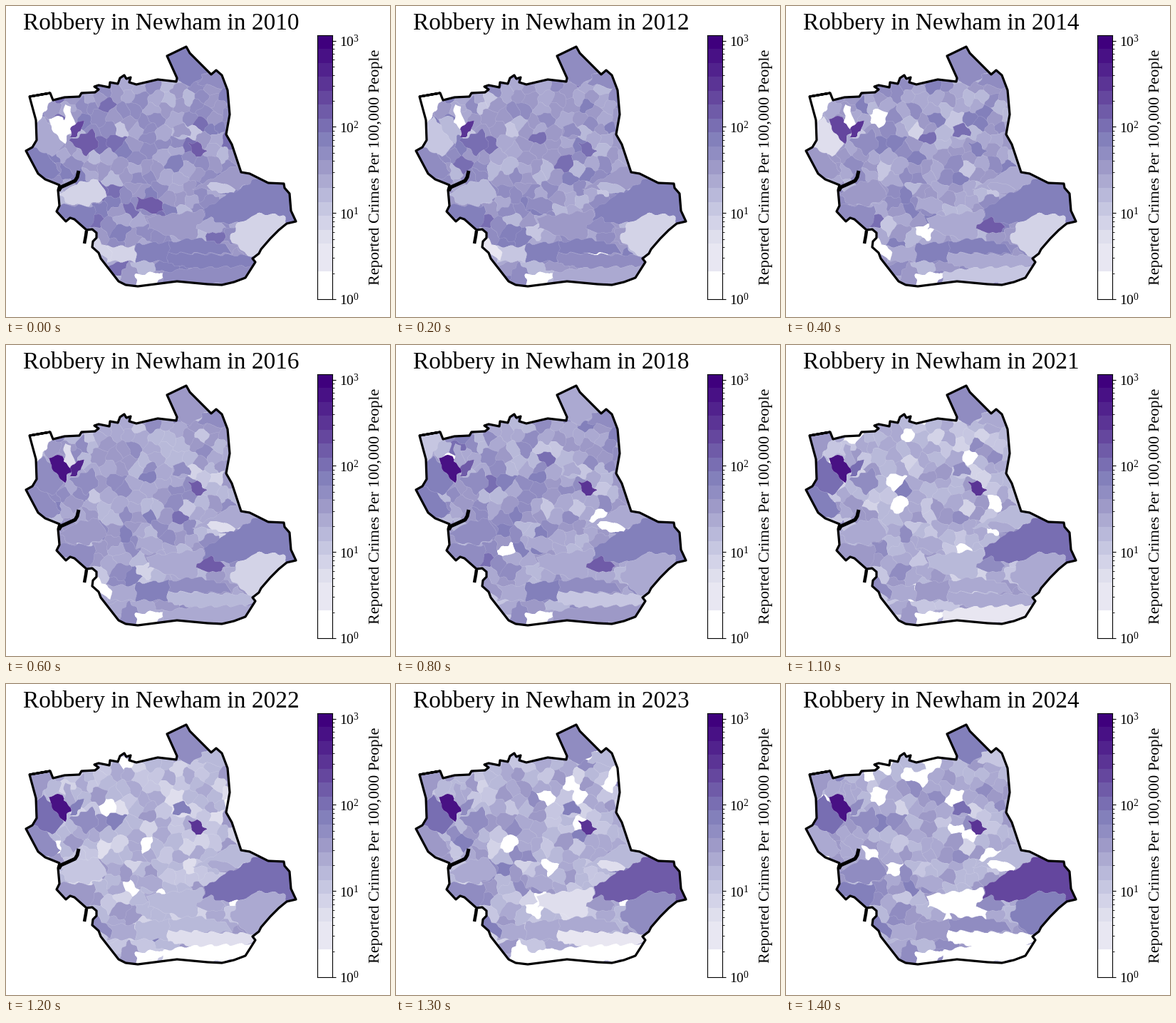
A matplotlib script that plays this animation: 539x436 px, repeating every 1.5 s.

```python
import numpy as np
import matplotlib.pyplot as plt
from matplotlib.animation import FuncAnimation
from matplotlib.colors import ListedColormap
from matplotlib.path import Path

W, H, DPI = 539, 436, 100
PX = 72 / DPI
YEARS = np.arange(2010, 2025)
BINS = 19
TILT = np.radians(20)
rng = np.random.default_rng(12)

plt.rcParams["font.family"] = "Liberation Serif"
plt.rcParams["mathtext.fontset"] = "stix"

palette = plt.get_cmap("Purples")(np.linspace(0, 1, BINS))[:, :3]
palette[:2] = 1
palette[2] = palette[3]

# Borough boundary, clockwise from the north-west corner
north = [(33, 127), (62, 122), (66, 132), (82, 128), (103, 127), (106, 122),
         (125, 121), (130, 117), (124, 113), (130, 111), (145, 114),
         (146, 107), (157, 109), (160, 101), (166, 97), (169, 102),
         (175, 100), (173, 107), (183, 110), (213, 103), (239, 106),
         (240, 101), (226, 70), (253, 57), (258, 66), (288, 96), (295, 90)]
east = [(303, 97), (311, 118), (314, 152), (309, 180), (317, 194),
        (330, 233), (342, 235), (368, 248), (390, 249), (391, 255),
        (398, 263), (400, 287), (407, 302), (394, 305), (383, 314),
        (371, 326), (358, 341), (355, 347), (346, 354), (350, 359),
        (336, 381)]
south = [(320, 387), (303, 391), (283, 390), (240, 386), (185, 393),
         (168, 391), (158, 386), (133, 354), (130, 346), (121, 338),
         (122, 330), (127, 325), (127, 318), (121, 313)]
west = [(113, 314), (96, 299), (90, 297), (84, 302), (71, 288), (75, 280),
        (73, 258), (75, 251), (55, 243), (45, 235), (28, 203), (37, 198),
        (43, 188), (42, 160)]
border = north + east + south + west

areas = []


def area(levels, *points):
    """A large district; its colour bin moves between the given years."""
    areas.append((levels, points))


# North and west
area({2010: 11, 2018: 8, 2024: 11},
     (222, 66), (253, 52), (284, 91), (260, 113), (238, 106))
area({2010: 10, 2018: 10, 2024: 6},
     (275, 98), (296, 86), (308, 98), (313, 118), (270, 110))
area({2010: 0, 2016: 0, 2018: 6, 2020: 9},
     (30, 124), (62, 120), (68, 131), (58, 143), (43, 169))
area({2010: 0, 2014: 14, 2016: 17},
     (61, 158), (78, 156), (93, 172), (82, 193), (61, 178))
area({2010: 0, 2014: 0, 2018: 8},
     (82, 140), (89, 140), (97, 167), (89, 172), (82, 163))
area({2010: 14, 2016: 16, 2018: 13, 2024: 10},
     (90, 172), (100, 162), (108, 163), (106, 177), (91, 187))
area({2010: 8, 2014: 4, 2016: 10, 2022: 12},
     (41, 170), (52, 157), (80, 193), (66, 213), (36, 198))
area({2010: 11, 2014: 9, 2020: 12, 2024: 8},
     (25, 203), (37, 198), (58, 208), (75, 232), (62, 244), (44, 238))
area({2010: 13, 2014: 10},
     (89, 190), (120, 174), (131, 192), (126, 203), (112, 210))
area({2010: 5, 2014: 9, 2020: 10, 2022: 6, 2024: 10},
     (75, 263), (104, 247), (130, 243), (143, 268), (113, 281), (85, 276))
area({2010: 11, 2022: 9, 2024: 11},
     (73, 278), (124, 281), (125, 297), (116, 314), (68, 290))

# Centre
area({2010: 13, 2014: 8},
     (184, 269), (215, 269), (222, 285), (212, 292), (184, 284))
area({2010: 13, 2014: 11, 2018: 15},
     (257, 194), (267, 190), (281, 206), (265, 214))
area({2010: 9, 2014: 12, 2018: 8, 2024: 12},
     (234, 169), (248, 166), (259, 173), (258, 182), (235, 184))
area({2010: 9, 2022: 7},
     (325, 222), (357, 241), (322, 257), (262, 256))
area({2010: 6, 2014: 8, 2018: 0, 2020: 8, 2022: 8, 2024: 0},
     (283, 250), (297, 246), (321, 257), (316, 264), (288, 259))
area({2010: 9, 2022: 7, 2024: 0},
     (198, 296), (276, 286), (278, 300), (262, 333), (200, 312))

# East and south
area({2010: 11, 2020: 11, 2022: 12, 2024: 14},
     (277, 305), (279, 283), (353, 241), (394, 246), (411, 302), (395, 306),
     (388, 293), (352, 291), (330, 304))
area({2010: 5, 2016: 5, 2018: 8, 2022: 8, 2024: 11},
     (326, 305), (352, 291), (388, 293), (397, 307), (350, 356), (313, 328))
area({2010: 8, 2014: 13, 2020: 13, 2022: 8, 2024: 10},
     (267, 306), (286, 296), (309, 311), (296, 320), (268, 313))
area({2010: 11, 2014: 8, 2018: 6, 2020: 11, 2022: 4, 2024: 0},
     (227, 346), (348, 350), (352, 359), (327, 368), (275, 370), (226, 361))
area({2010: 11, 2020: 11, 2022: 7, 2024: 9},
     (182, 334), (230, 330), (226, 358), (182, 358))
area({2010: 11, 2020: 10, 2022: 7, 2024: 10},
     (230, 331), (266, 325), (310, 335), (316, 347), (227, 346))
area({2010: 5, 2014: 8},
     (140, 337), (181, 337), (183, 358), (143, 358))
area({2010: 5, 2014: 0, 2016: 0, 2018: 9, 2024: 11},
     (123, 318), (133, 333), (147, 342), (148, 356), (118, 340))
area({2010: 0},
     (182, 377), (212, 373), (223, 376), (206, 394), (183, 395))
area({2010: 10, 2014: 6, 2018: 9, 2020: 6, 2022: 0},
     (222, 374), (250, 368), (348, 364), (337, 386), (215, 394))


def ward_map():
    """Label every half pixel: small tilted wards first, then areas."""
    y, x = np.mgrid[0.25:H:0.5, 0.25:W:0.5]
    wx = x + 1.5 * np.sin(0.34 * y + 2 * np.sin(0.17 * x))
    wy = y + 1.5 * np.sin(0.31 * x + 2 * np.sin(0.19 * y))
    sites = []
    for row, sy in enumerate(range(96, 400, 16)):
        step = 20 if sy < 325 else 36
        for sx in range(34 + step // 2 * (row % 2), 345, step):
            sites.append((sx, sy) + rng.uniform(-7, 7, 2))
    label = np.zeros(x.shape, int)
    best = np.full(x.shape, np.inf)
    cos, sin = np.cos(TILT), np.sin(TILT)
    for k, (sx, sy) in enumerate(sites):
        u, v = wx - sx, wy - sy
        dist = np.abs(cos * u + sin * v) ** 3 + np.abs(cos * v - sin * u) ** 3
        near = dist < best
        label[near], best[near] = k, dist[near]
    points = np.column_stack([wx.ravel(), wy.ravel()])
    for k, (_, shape) in enumerate(areas, len(sites)):
        label[Path(shape).contains_points(points).reshape(x.shape)] = k
    points = np.column_stack([x.ravel(), y.ravel()])
    land = Path(border).contains_points(points).reshape(x.shape)
    return label, land, len(sites)


def ward_levels(count):
    """Colour bin of every ward in every year."""
    key = [2010, 2016, 2018, 2022, 2024]
    mean = np.interp(YEARS, key, [9.3, 8.5, 8.7, 7, 8])[:, None]
    empty = np.interp(YEARS, key, [0.01, 0.01, 0.02, 0.06, 0.08])[:, None]
    shape = len(YEARS), count
    small = mean + rng.normal(0, 0.9, count) + rng.normal(0, 1, shape)
    small = np.clip(small, 4, 12)
    small[rng.random(shape) < empty] = 0
    large = [np.interp(YEARS, list(a), list(a.values())) for a, _ in areas]
    return np.rint(np.hstack([small, np.transpose(large)])).astype(int)


label, land, count = ward_map()
levels = ward_levels(count)
seam = np.zeros(label.shape, bool)
seam[:, 1:] |= label[:, 1:] != label[:, :-1]
seam[1:] |= label[1:] != label[:-1]


def paint(i):
    rgb = palette[levels[i][label]]
    rgb[seam] += 0.2 * (1 - rgb[seam])
    rgb[~land] = 1
    return rgb.reshape(H, 2, W, 2, 3).mean(axis=(1, 3))


fig = plt.figure(figsize=(W / DPI, H / DPI), dpi=DPI, facecolor="white")
ax = fig.add_axes([0, 0, 1, 1])
picture = ax.imshow(paint(0), extent=(0, W, H, 0), interpolation="nearest",
                    aspect="auto")
ax.set(xlim=(0, W), ylim=(H, 0))
ax.axis("off")


def stroke(points, width):
    ax.plot(*zip(*points), color="black", lw=width * PX,
            solid_joinstyle="round", solid_capstyle="butt")


stroke(border + border[:2], 3.2)
stroke([(113, 315), (112, 322), (110, 333)], 4.5)
stroke([(74, 259), (77, 254), (86, 250), (97, 245), (100, 240), (102, 231)], 5)
title = ax.text(218, 33, "", size=24, ha="center", va="baseline")
ax.text(524, 225.5, "Reported Crimes Per 100,000 People", size=16,
        rotation=90, rotation_mode="anchor", ha="center", va="baseline")

# Logarithmic colour scale
top = 10 ** 3.063
bar = fig.add_axes([437 / W, 1 - 411 / H, 21 / W, 370 / H])
bar.set_yscale("log")
bar.pcolormesh([0, 1], np.geomspace(1, top, BINS + 1),
               np.arange(BINS)[:, None], cmap=ListedColormap(palette))
bar.set(xlim=(0, 1), ylim=(1, top), xticks=[])
bar.yaxis.tick_right()
bar.tick_params(axis="y", labelsize=14)


def draw(i):
    picture.set_data(paint(i))
    title.set_text(f"Robbery in Newham in {YEARS[i]}")
    return picture, title


anim = FuncAnimation(fig, draw, frames=len(YEARS), interval=100, repeat=True)
plt.show()
```
